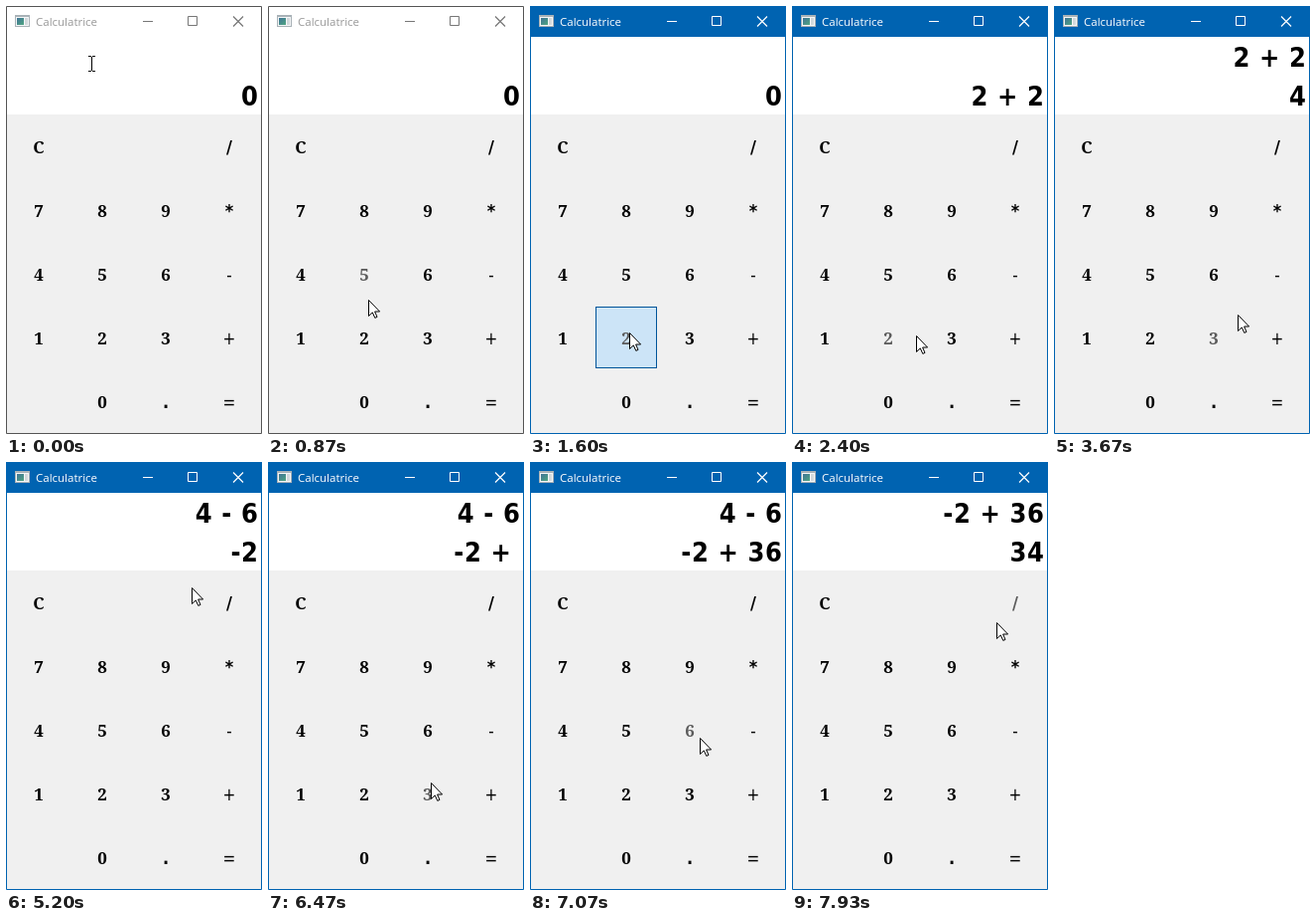
An HTML page with a canvas that plays this animation: 258x430 px, repeating every 8 s.

```html
<!DOCTYPE html>
<html lang="fr">
<head>
<meta charset="utf-8">
<title>Calculatrice</title>
<style>
  html, body { margin: 0; width: 100%; height: 100%; overflow: hidden; }
  canvas { display: block; width: 258px; height: 430px; }
</style>
</head>
<body>
<canvas width="258" height="430"></canvas>
<script>
const ctx = document.querySelector('canvas').getContext('2d');
const TICK = 1000 / 15, LOOP = 120;
const SANS = '"DejaVu Sans Condensed", "DejaVu Sans", sans-serif';
const SERIF = '"Noto Serif", serif';
const KEYS = ['C  /', '789*', '456-', '123+', ' 0.='];
const CELL = 64, KEYS_TOP = 110;

// Pressed keys with the tick of each press; released one tick later.
const CLICKS = [
  [24, '2'], [30, '+'], [34, '2'], [42, '='], [60, '-'], [66, '6'],
  [75, '='], [94, '+'], [100, '3'], [104, '6'], [113, '=']
];
// Places the pointer passes on its way between keys: [tick, x, y]
const DETOURS = [
  [3, 85, 34], [13, 101, 295], [36, 125, 331], [51, 134, 295], [55, 185, 310],
  [78, 187, 126], [80, 264, 89], [82, 400, 89], [85, 247, 93],
  [97, 164, 322], [119, 206, 161]
];
const STOPS = planRoute([86, 58]);

function keyCentre(key) {
  const row = KEYS.findIndex(keys => keys.includes(key));
  return [33 + KEYS[row].indexOf(key) * CELL, KEYS_TOP + 32 + row * CELL];
}

function planRoute(start) {
  const stops = [[0, ...start]];
  for (const [tick, place, y] of [...CLICKS, ...DETOURS].sort((a, b) => a[0] - b[0])) {
    if (typeof place === 'number') {
      stops.push([tick, place, y]);
    } else {
      const [cx, cy] = keyCentre(place);
      const arrival = Math.max(tick - 3, stops.at(-1)[0] + 2);
      stops.push([arrival, cx + 3, cy - 6], [tick + 1, cx + 3, cy - 6]);
    }
  }
  return stops;
}

function pointerAt(tick) {
  const i = STOPS.findLastIndex(stop => stop[0] <= tick);
  const [t0, x0, y0] = STOPS[i], [t1, x1, y1] = STOPS[i + 1] ?? [LOOP, x0, y0];
  const u = (tick - t0) / (t1 - t0), ease = u * u * (3 - 2 * u);
  return [Math.round(x0 + (x1 - x0) * ease), Math.round(y0 + (y1 - y0) * ease)];
}

function calculate(tick) {
  let upper = '', lower = '0';
  for (const [pressed, key] of CLICKS) {
    if (pressed >= tick) break;
    if (key === '=') {
      const [a, sign, b] = lower.split(' ');
      upper = lower;
      lower = String(sign === '+' ? +a + +b : a - b);
    } else if ('+-'.includes(key)) {
      lower += ` ${key} `;
    } else {
      lower = lower === '0' ? key : lower + key;
    }
  }
  return [upper, lower];
}

function rect(color, x, y, w, h) {
  ctx.fillStyle = color;
  ctx.fillRect(x, y, w, h);
}

function label(text, x, y, font, color, align) {
  ctx.font = font;
  ctx.fillStyle = color;
  ctx.textAlign = align;
  ctx.fillText(text, x, y);
}

function stroke(path, color, width = 1) {
  ctx.strokeStyle = color;
  ctx.lineWidth = width;
  ctx.stroke(new Path2D(path));
}

function drawTitleBar(active) {
  rect(active ? '#0063b1' : '#fff', 0, 0, 258, 31);
  rect('#a9b2b7', 9, 9, 15, 12);
  rect('#f4f6f7', 10, 11, 13, 9);
  const glass = ctx.createLinearGradient(11, 12, 17, 19);
  glass.addColorStop(0, '#3f7396');
  glass.addColorStop(1, '#4fa383');
  rect(glass, 11, 12, 7, 7);
  rect('#d3d9dc', 19, 12, 3, 7);
  label('Calculatrice', 30, 20, '11.5px "Open Sans", "Noto Sans", sans-serif',
    active ? '#fff' : '#999', 'left');
  const ink = active ? '#fff' : '#777';
  stroke('M138 15.5h10 M183.5 10.5h9v9h-9z', ink);
  stroke('M229 10.5l10 10 M239 10.5l-10 10', ink, 1.2);
}

function drawDisplay(tick) {
  const font = 'bold 27px ' + SANS;
  ctx.font = font;
  const spacing = 17.5 - ctx.measureText('0').width;
  ctx.letterSpacing = spacing + 'px';
  calculate(tick).forEach((line, i) =>
    label(line, 254 + spacing, 61 + i * 39, font, '#000', 'right'));
  ctx.letterSpacing = '0px';
}

function keyFont(key) {
  if ('+-='.includes(key)) return '17px ' + SANS;
  return '/*.'.includes(key) ? 'bold 18px ' + SANS : 'bold 17px ' + SERIF;
}

function drawKeys(x, y, pressed) {
  const hoverCol = Math.floor((x - 1) / CELL), hoverRow = Math.floor((y - KEYS_TOP) / CELL);
  KEYS.forEach((keys, row) => [...keys].forEach((key, col) => {
    const hovered = col === hoverCol && row === hoverRow;
    const left = 2 + col * CELL, top = KEYS_TOP + row * CELL;
    if (hovered && pressed) {
      rect('#005499', left, top, 62, 62);
      rect('#cce4f7', left + 1, top + 1, 60, 60);
    }
    label(key, left + 31, top + 38, keyFont(key), hovered ? '#5b5b5b' : '#000', 'center');
  }));
}

function drawPointer(x, y) {
  ctx.save();
  ctx.translate(x, y);
  if (x > 256) {
    stroke('M-11 .5H11 M-7 -3.5L-11 .5L-7 4.5 M7 -3.5L11 .5L7 4.5', '#000');
  } else if (y > 30 && y < 109) {
    stroke('M-3 -7.5H0 M1 -7.5H4 M.5 -7V7 M-3 7.5H0 M1 7.5H4', '#000');
  } else {
    const arrow = 'M.5 .5V16.5L4.3 12.9L6.8 18.4L9 17.4L6.6 12H11.6Z';
    ctx.fillStyle = '#fff';
    ctx.fill(new Path2D(arrow));
    stroke(arrow, '#000');
  }
  ctx.restore();
}

function draw(now) {
  // The small offset absorbs timestamps rounded down to 10 ms.
  const tick = Math.floor((now + 4) / TICK) % LOOP;
  const [x, y] = pointerAt(tick);
  const active = tick >= CLICKS[0][0];
  rect('#fff', 0, 0, 258, 109);
  rect('#f0f0f0', 0, 109, 258, 321);
  drawTitleBar(active);
  drawDisplay(tick);
  drawKeys(x, y, CLICKS.some(([pressed]) => pressed === tick));
  stroke('M.5 .5H257.5V429.5H.5Z', active ? '#0063b1' : '#555');
  drawPointer(x, y);
  requestAnimationFrame(draw);
}
requestAnimationFrame(draw);
</script>
</body>
</html>
```
